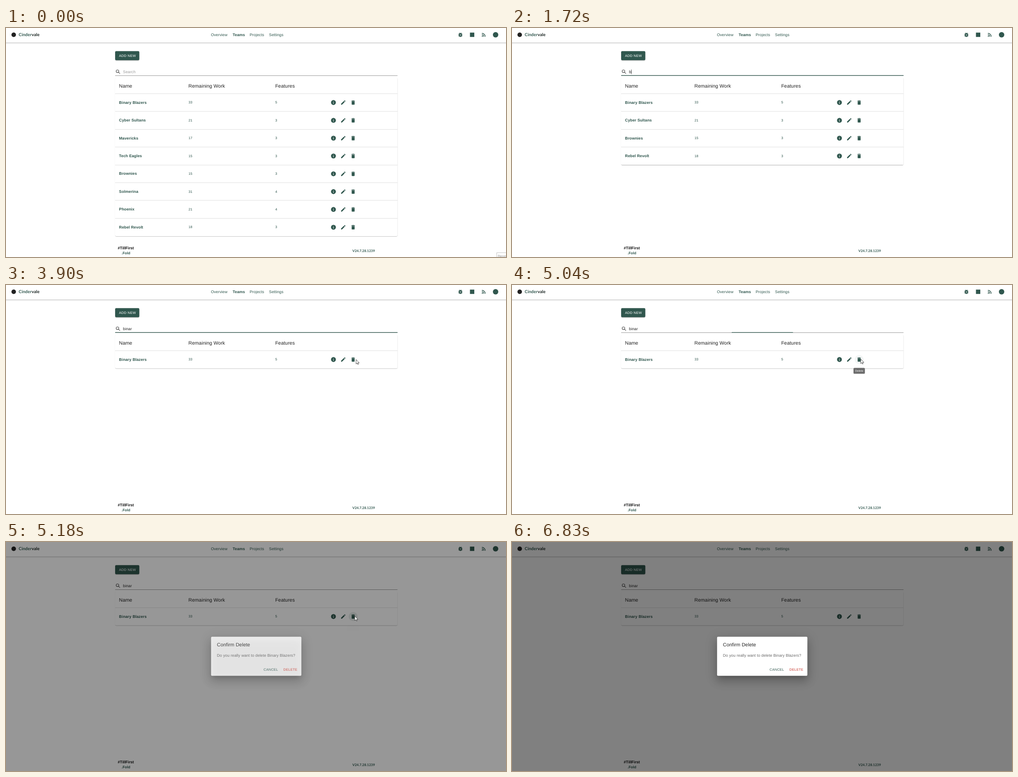
Recreate the animation shown at these times as an HTML page with a canvas. Size 1104x507 px, loop 7.16 s.

```html
<!DOCTYPE html>
<html lang="en">
<head>
<meta charset="utf-8">
<title>Teams</title>
<style>
html, body { margin: 0; width: 100%; height: 100%; overflow: hidden; background: #fff; }
canvas { display: block; }
</style>
</head>
<body>
<canvas id="stage" width="1104" height="507"></canvas>
<script>
const ctx = document.getElementById('stage').getContext('2d');
const LOOP = 7160, ZOOM = 0.54;
const GREEN = '#30574e', INK = 'rgba(0,0,0,.87)';
const SANS = '"Liberation Sans", Arial, sans-serif', ROUND = 'Lato, sans-serif';
const LEFT = 241, WIDTH = 623.5, ROW_TOP = 145, ROW = 39.45;

const teams = [
  ['Binary Blazers', 33, 5], ['Cyber Sultans', 21, 3], ['Mavericks', 17, 3],
  ['Tech Eagles', 15, 3], ['Brownies', 15, 3], ['Solmerina', 31, 4],
  ['Phoenix', 21, 4], ['Rebel Revolt', 18, 3]
];
const typing = [[1720, 'b'], [1850, 'bin'], [1980, 'bina'], [2110, 'binar']];

// time, x, y
const arrive = [[70, 1096, 497], [210, 1020, 450], [350, 800, 330], [520, 520, 210],
  [740, 336, 137], [880, 298, 118], [1020, 283, 104], [1230, 277, 92.5], [1720, 277, 92.5]];
const work = [[2780, 276, 141], [2900, 300, 150], [3080, 440, 182], [3260, 620, 191],
  [3400, 712, 180], [3480, 741, 172], [3620, 780, 167], [3760, 778, 166], [3900, 773, 165],
  [4040, 770, 164], [6340, 770, 164], [6480, 840, 230], [6620, 960, 350], [6760, 1086, 484],
  [6830, 1090, 488]];

// MUI-like elevations: dy, blur, spread, alpha
const LIFT = {
  bar: [[2, 4, -1, .2], [4, 5, 0, .14], [1, 10, 0, .12]],
  paper: [[2, 1, -1, .2], [1, 1, 0, .14], [1, 3, 0, .12]],
  button: [[3, 1, -2, .2], [2, 2, 0, .14], [1, 5, 0, .12]],
  dialog: [[11, 15, -7, .2], [24, 38, 3, .14], [9, 46, 8, .12]]
};

const PENCIL = new Path2D('M3 17.25V21h3.75L17.81 9.94l-3.75-3.75L3 17.25zM20.71 7.04c.39-.39.39-1.02 0-1.41l-2.34-2.34c-.39-.39-1.02-.39-1.41 0l-1.83 1.83 3.75 3.75 1.83-1.83z');
const TRASH = new Path2D('M6 19c0 1.1.9 2 2 2h8c1.1 0 2-.9 2-2V7H6v12zM19 4h-3.5l-1-1h-5l-1 1H5v2h14V4z');
const ARROW = new Path2D('M0 0V10L2.3 7.9 3.9 11 5.3 10.4 3.8 7.4H7z');

const clamp = v => Math.max(0, Math.min(1, v));

// Cubic bezier (x1, 0, x2, 1)
function ease(p, x1, x2) {
  p = clamp(p);
  let lo = 0, hi = 1, s = 0.5;
  for (let i = 0; i < 18; i++) {
    s = (lo + hi) / 2;
    const x = 3 * (1 - s) * s * ((1 - s) * x1 + s * x2) + s * s * s;
    if (x < p) lo = s; else hi = s;
  }
  return s * s * (3 - 2 * s);
}
const easeOut = p => ease(p, 0, 0.2);
const easeInOut = p => ease(p, 0.4, 0.2);

function along(path, t) {
  const i = path.findIndex(k => k[0] > t);
  if (i < 1) return null;
  const [t0, x0, y0] = path[i - 1], [t1, x1, y1] = path[i];
  const p = (t - t0) / (t1 - t0);
  return [x0 + (x1 - x0) * p, y0 + (y1 - y0) * p];
}

// cy is the middle of the capital letters
function text(str, x, cy, size, color, weight = 400, gap = 0.0094, family = SANS) {
  ctx.font = `${weight} ${size}px ${family}`;
  ctx.letterSpacing = size * gap + 'px';
  ctx.fillStyle = color;
  ctx.fillText(str, x, cy + size * 0.358);
  return ctx.measureText(str).width;
}

function box(x, y, w, h, r, fill) {
  ctx.fillStyle = fill;
  ctx.beginPath();
  ctx.roundRect(x, y, w, h, r);
  ctx.fill();
}

function disc(x, y, r, fill) {
  ctx.fillStyle = fill;
  ctx.beginPath();
  ctx.arc(x, y, r, 0, 7);
  ctx.fill();
}

function raised(x, y, w, h, r, fill, lift) {
  for (const [dy, blur, spread, a] of lift) {
    const s = spread * ZOOM;
    ctx.save();
    ctx.shadowColor = `rgba(0,0,0,${a})`;
    ctx.shadowBlur = blur * ZOOM;
    ctx.shadowOffsetY = 2000 + dy * ZOOM;
    box(x - s, y - s - 2000, w + 2 * s, h + 2 * s, r, '#000');
    ctx.restore();
  }
  box(x, y, w, h, r, fill);
}

// Runs draw in a 24 unit icon box centred on x, y
function icon(x, y, draw) {
  ctx.save();
  ctx.translate(x, y);
  ctx.scale(ZOOM, ZOOM);
  ctx.translate(-12, -12);
  ctx.fillStyle = ctx.strokeStyle = GREEN;
  draw();
  ctx.restore();
}

function line(...pts) {
  ctx.beginPath();
  for (let i = 0; i < pts.length; i += 2) ctx.lineTo(pts[i], pts[i + 1]);
  ctx.stroke();
}

function bug() {
  ctx.lineWidth = 2;
  for (const y of [9, 13, 17]) line(4, y, 20, y);
  line(7.7, 3.7, 10.5, 6.5);
  line(16.3, 3.7, 13.5, 6.5);
  box(6, 5, 12, 16, 6, GREEN);
  ctx.fillStyle = '#fff';
  ctx.fillRect(10, 10, 4, 2);
  ctx.fillRect(10, 14, 4, 2);
}

function feed() {
  disc(6.2, 17.8, 2.2, GREEN);
  ctx.lineWidth = 2.83;
  for (const r of [8.5, 14.15]) {
    ctx.beginPath();
    ctx.arc(4, 20, r, -Math.PI / 2, 0);
    ctx.stroke();
  }
}

function info() {
  disc(12, 12, 10, GREEN);
  ctx.fillStyle = '#fff';
  ctx.fillRect(11, 7, 2, 2);
  ctx.fillRect(11, 11, 2, 6);
}

function lens() {
  ctx.strokeStyle = 'rgba(0,0,0,.7)';
  ctx.lineWidth = 2;
  ctx.beginPath();
  ctx.arc(9.5, 9.5, 5.5, 0, 7);
  ctx.stroke();
  line(13.6, 13.6, 19.8, 19.8);
}

function header() {
  raised(-20, -20, 1144, 52, 0, '#fff', LIFT.bar);
  disc(17, 15, 5, '#222');
  const w = text('Cinder', 28, 15, 9.5, GREEN, 700, 0.01, ROUND);
  text('vale', 28 + w, 15, 9.5, '#1c2624', 700, 0.01, ROUND);
  text('Overview', 452.4, 15, 8.64, GREEN);
  text('Teams', 500.6, 15, 8.64, GREEN, 700);
  text('Projects', 538, 15, 8.64, GREEN);
  text('Settings', 580.8, 15, 8.64, GREEN);
  icon(1003.3, 15, bug);
  box(1024.4, 10.2, 9.6, 9.6, 0, GREEN);
  icon(1055, 15, feed);
  disc(1081, 15, 6, GREEN);
}

function search(t, query) {
  icon(247.5, 97, lens);
  const w = text(query || 'Search', 258.3, 97, 8.64, query ? INK : 'rgba(0,0,0,.4)');
  ctx.fillStyle = '#8f8f8f';
  ctx.fillRect(LEFT, 105, WIDTH, 0.9);

  const grown = t < 4955 ? easeOut((t - 1300) / 200) : 1 - easeOut((t - 4955) / 200);
  ctx.fillStyle = GREEN;
  ctx.fillRect(LEFT + WIDTH * (1 - grown) / 2, 104.5, WIDTH * grown, 1.3);

  const lit = t < 2380 || Math.floor((t - 2380) / 560) % 2 === 1;
  if (t > 1300 && t < 4955 && lit) {
    ctx.fillStyle = '#222';
    ctx.fillRect(query ? 258.3 + w : 258, 92, 0.8, 10);
  }
}

function table(t, query) {
  const rows = teams.filter(r => r[0].toLowerCase().includes(query));
  raised(LEFT, 110, WIDTH, ROW_TOP - 110 + ROW * rows.length + 0.3, 2.2, '#fff', LIFT.paper);
  text('Name', 249.5, 127.8, 10.8, INK, 400, 0.0075);
  text('Remaining Work', 402.8, 127.8, 10.8, INK, 400, 0.0075);
  text('Features', 594.4, 127.8, 10.8, INK, 400, 0.0075);
  rows.forEach(([name, left, count], i) => {
    const y = ROW_TOP + ROW * i, cy = y + 19.6;
    ctx.fillStyle = '#e0e0e0';
    ctx.fillRect(LEFT, Math.round(y - 0.3), WIDTH, 1);
    text(name, 249.6, cy, 8.64, GREEN, 700);
    text(left, 403, cy, 7.56, GREEN, 400, 0.0107);
    text(count, 594.5, cy, 7.56, GREEN, 400, 0.0107);
    icon(723, cy + 0.4, info);
    icon(744.7, cy + 0.4, () => ctx.fill(PENCIL));
    if (i === 0) hover(t, cy + 0.4);
    icon(766.5, cy + 0.4, () => ctx.fill(TRASH));
  });
}

function hover(t, y) {
  if (t < 4040 || t >= 5320) return;
  const a = 0.05 * clamp((t - 4040) / 150) + 0.13 * clamp((t - 5110) / 140);
  disc(766.5, y, 10, `rgba(48,87,78,${a})`);
}

function footer() {
  text('#TillFirst', 246.8, 487.2, 8.6, '#111', 700, 0, SANS);
  text('.Fold', 255.2, 497.8, 8, GREEN, 700, 0, SANS);
  text('V24.7.28.1239', 764.8, 493, 7.5, GREEN, 700, 0, ROUND);
}

function recorderTip() {
  box(1083, 497, 40, 20, 0, '#c4c4c4');
  box(1084, 498, 40, 20, 0, '#fff');
  text('Record', 1086, 504.6, 6.6, '#8a8a8a');
}

function dialog(t) {
  const p = easeInOut((t - 5060) / 225);
  if (p <= 0) return;
  ctx.fillStyle = `rgba(0,0,0,${0.5 * p})`;
  ctx.fillRect(0, 0, 1104, 507);
  ctx.globalAlpha = p;
  // Shadows and contents share the same fade
  raised(452.8, 209.8, 199.4, 86.4, 2.2, '#fff', LIFT.dialog);
  text('Confirm Delete', 465.8, 227, 10.8, INK, 400, 0.0075);
  text('Do you really want to delete Binary Blazers?', 465.8, 250.6, 8.64, 'rgba(0,0,0,.6)');
  text('CANCEL', 568.8, 282.3, 7.56, GREEN, 400, 0.0286);
  text('DELETE', 612.6, 282.3, 7.56, '#c8392f', 400, 0.0286);
  ctx.globalAlpha = 1;
}

function tooltip(t) {
  const a = easeInOut((t - 4110) / 200) * (1 - easeInOut((t - 5060) / 150));
  if (a <= 0) return;
  ctx.globalAlpha = a;
  box(754, 183.4, 25.2, 13.2, 2.2, 'rgba(97,97,97,.92)');
  text('Delete', 758, 190, 5.94, '#fff', 500);
  ctx.globalAlpha = 1;
}

function pointer(t) {
  const at = along(t < 2000 ? arrive : work, t);
  if (!at) return;
  const [x, y] = at;
  ctx.save();
  ctx.translate(x, y);
  if (x < 300 && (y < 107 || t > 2700)) {
    ctx.fillStyle = '#333';
    ctx.fillRect(-0.5, -5, 1, 10);
    for (const dy of [-5.4, 4.4]) {
      ctx.fillRect(-2.4, dy, 2, 0.9);
      ctx.fillRect(0.4, dy, 2, 0.9);
    }
  } else {
    ctx.fillStyle = '#fff';
    ctx.fill(ARROW);
    ctx.strokeStyle = '#111';
    ctx.lineWidth = 0.7;
    ctx.stroke(ARROW);
  }
  ctx.restore();
}

function draw(now) {
  const t = now % LOOP;
  const query = typing.reduce((q, [at, s]) => t >= at ? s : q, '');
  ctx.textRendering = 'geometricPrecision';
  ctx.fillStyle = '#fff';
  ctx.fillRect(0, 0, 1104, 507);
  header();
  raised(LEFT, 51.3, 53.3, 20, 2.2, GREEN, LIFT.button);
  text('ADD NEW', 249.6, 61.2, 7.56, '#fff', 400, 0.0286);
  table(t, query);
  search(t, query);
  footer();
  if (t < 70) recorderTip();
  dialog(t);
  tooltip(t);
  pointer(t);
}

const start = performance.now();
function tick() {
  draw(performance.now() - start);
  requestAnimationFrame(tick);
}
tick();
</script>
</body>
</html>
```
